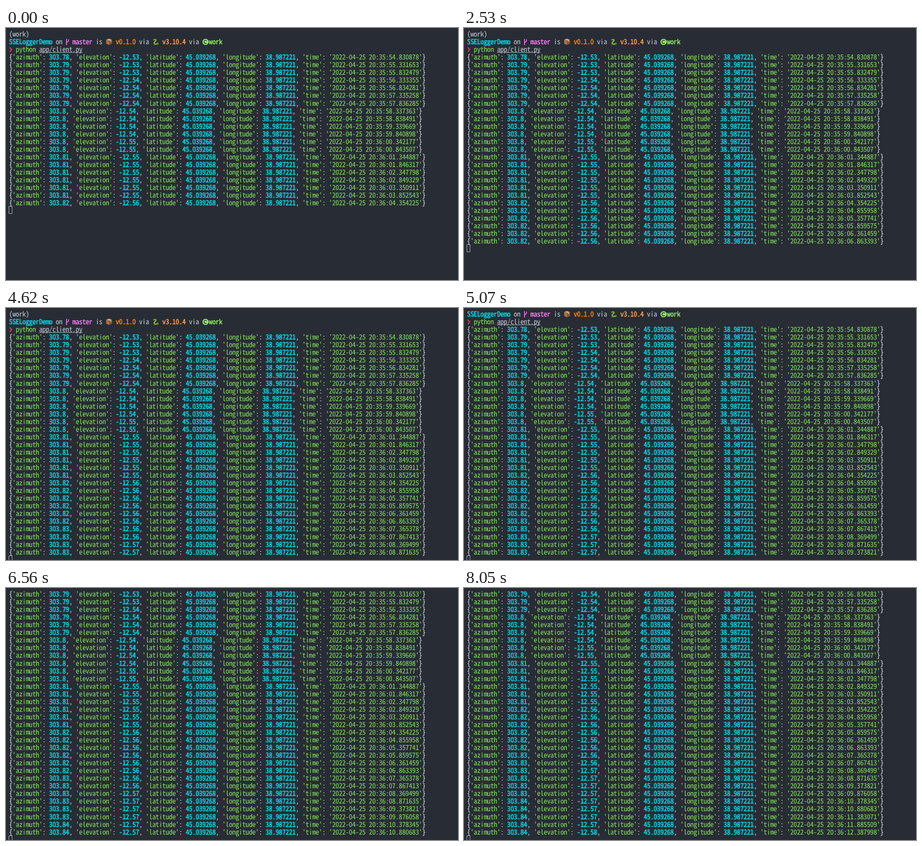
An HTML page with a canvas that plays this animation: 1000x560 px, repeating every 8200 ms.

```html
<!DOCTYPE html>
<html lang="en">
<head>
<meta charset="utf-8">
<title>Terminal log</title>
<style>
html, body { margin: 0; width: 100%; height: 100%; overflow: hidden; background: #282c34; }
canvas { display: block; width: 100vw; height: 100vh; }
</style>
</head>
<body>
<canvas id="term" width="1000" height="560"></canvas>
<script>
const ctx = document.getElementById('term').getContext('2d');
const LOOP = 8200, LEFT = 7, CELL = 7.37, PITCH = 17.05, MIDDLE = 13.4, LAST_ROW = 32;
const FAMILY = '"Noto Sans Mono CJK JP", "Noto Sans Mono CJK SC", "Noto Sans Mono", "DejaVu Sans Mono", monospace';
const C = {
  bg: '#282c34', fg: '#b9bfca', green: '#7fd65f', cyan: '#00dfee', lime: '#8bee5b',
  pink: '#f07af0', orange: '#ff8700', amber: '#ffa348', red: '#f0455a'
};

const START_COUNT = 20;
const TICK = 149.07, TICK_LEAD = 8; // screen refresh period, ms
const TICKS_PER_RECORD = 3.36;

// Records arrive every half second, with a delay that slowly builds up.
function timeStamp(i) {
  const delay = (0.75 * i + 0.0252 * i * i) / 1000;
  const sec = 54.830878 + i / 2 + delay;
  const minute = 35 + Math.floor(sec / 60);
  return `20:${minute}:${(sec % 60).toFixed(6).padStart(9, '0')}`;
}

function record(i) {
  const azimuth = +(303.78 + Math.ceil(i / 6) / 100).toFixed(2);
  const elevation = (-12.53 - Math.floor((i + 5) / 8) / 100).toFixed(2);
  return `{'azimuth': ${azimuth}, 'elevation': ${elevation}, 'latitude': 45.039268, ` +
    `'longitude': 38.987221, 'time': '2022-04-25 ${timeStamp(i)}'}`;
}

function recordCount(t) {
  const tick = Math.floor((t + TICK_LEAD) / TICK);
  return START_COUNT + Math.max(0, Math.floor((tick - 0.16) / TICKS_PER_RECORD));
}

// Font size from the cell width, a little tight like a narrow terminal face.
ctx.textRendering = 'geometricPrecision';
ctx.font = `1000px ${FAMILY}`;
const digit = ctx.measureText('0');
const size = 1.05 * CELL / digit.width * 1000;
const digitHeight = digit.actualBoundingBoxAscent * size / 1000;

const colX = col => LEFT + col * CELL;
const baseline = row => Math.round(MIDDLE + digitHeight / 2 + row * PITCH);

// A thin outline over the regular weight gives the semi-bold look.
function put(text, col, row, color, bold) {
  ctx.font = `${size}px ${FAMILY}`;
  ctx.textAlign = 'center';
  ctx.lineJoin = 'round';
  ctx.fillStyle = ctx.strokeStyle = color;
  ctx.lineWidth = bold ? 0.5 : 0.12;
  const y = baseline(row);
  [...text].forEach((ch, i) => {
    if (ch === ' ') return;
    const x = colX(col + i + 0.5);
    ctx.fillText(ch, x, y);
    ctx.strokeText(ch, x, y);
  });
}

function stroke(color, width, trace) {
  ctx.strokeStyle = color;
  ctx.lineWidth = width;
  ctx.beginPath();
  trace();
  ctx.stroke();
}

function poly(color, ...pts) {
  ctx.fillStyle = color;
  ctx.beginPath();
  pts.forEach(([x, y]) => ctx.lineTo(x, y));
  ctx.fill();
}

function at(col, row, draw) {
  ctx.save();
  ctx.translate(colX(col), 5 + row * PITCH);
  draw();
  ctx.restore();
}

function branchIcon() {
  stroke(C.pink, 1.7, () => {
    ctx.moveTo(1.6, 2);
    ctx.lineTo(1.6, 16);
    ctx.moveTo(6, 3);
    ctx.lineTo(6, 6);
    ctx.bezierCurveTo(6, 10, 1.6, 8, 1.6, 12);
  });
}

function boxIcon() {
  poly('#c58a5a', [7.4, 1.5], [14, 4], [7.4, 6.8], [0.8, 4]);
  poly('#a9704a', [0.8, 4], [7.4, 6.8], [7.4, 15.8], [0.8, 12.8]);
  poly('#895437', [14, 4], [7.4, 6.8], [7.4, 15.8], [14, 12.8]);
  poly('#e3c29a', [3.3, 3], [5, 2.4], [11.6, 5], [11.6, 8], [9.9, 8.7], [9.9, 5.7]);
}

function snakeIcon() {
  ctx.lineCap = 'round';
  stroke('#8bb83e', 2.6, () => {
    ctx.moveTo(3, 4.2);
    ctx.bezierCurveTo(9, 2, 9, 6, 6, 8);
    ctx.bezierCurveTo(2, 11, 4, 14, 8, 13.5);
    ctx.lineTo(12.5, 13);
  });
  stroke('#688e2d', 1.8, () => {
    ctx.moveTo(3.5, 14.5);
    ctx.lineTo(10, 14.5);
    ctx.quadraticCurveTo(14, 13, 12, 10.5);
  });
  ctx.fillStyle = C.bg;
  ctx.fillRect(3.4, 3.4, 1, 1);
}

function envIcon() {
  ctx.fillStyle = C.lime;
  ctx.beginPath();
  ctx.arc(7, 8.8, 6.9, 0, 2 * Math.PI);
  ctx.fill();
  stroke(C.bg, 1.7, () => ctx.arc(7.2, 8.8, 3.5, 0.75, 2 * Math.PI - 0.75));
}

function drawStatus(row) {
  put('SSELoggerDemo', 0, row, C.cyan, true);
  put('on', 14, row, C.fg);
  at(17, row, branchIcon);
  put('master', 19, row, C.pink, true);
  put('is', 26, row, C.fg);
  at(29, row, boxIcon);
  put('v0.1.0', 32, row, C.orange, true);
  put('via', 39, row, C.fg);
  at(43, row, snakeIcon);
  put('v3.10.4', 46, row, C.amber, true);
  put('via', 54, row, C.fg);
  at(58, row, envIcon);
  put('work', 60, row, C.lime, true);
}

function drawCommand(row) {
  at(0, row, () => stroke(C.red, 2, () => {
    ctx.moveTo(1.5, 4);
    ctx.lineTo(5.5, 8.9);
    ctx.lineTo(1.5, 13.8);
  }));
  put('python', 2, row, C.green);
  put('app/client.py', 9, row, C.fg);
  ctx.fillRect(colX(9), Math.round(19.5 + row * PITCH), 13 * CELL, 1);
}

function drawRecord(text, row) {
  for (const { 0: token, index } of text.matchAll(/'[^']*'|-?\d[\d.]*|[{}:,]/g)) {
    if (token[0] === "'") put(token, index, row, C.green);
    else if (/\d/.test(token)) put(token, index, row, C.cyan, true);
    else put(token, index, row, C.fg, /[{}]/.test(token));
  }
}

const header = [row => put('(work)', 0, row, C.fg), drawStatus, drawCommand];

function draw(count) {
  ctx.fillStyle = C.bg;
  ctx.fillRect(0, 0, 1000, 560);
  const lines = header.length + count;
  const scroll = Math.max(0, lines - LAST_ROW);
  for (let i = scroll; i < lines; i++) {
    const row = i - scroll;
    if (i < header.length) header[i](row);
    else drawRecord(record(i - header.length), row);
  }
  const top = Math.round(5 + (lines - scroll) * PITCH);
  stroke(C.fg, 1, () => ctx.rect(LEFT - 0.5, top - 0.5, 7, 16));
}

let shown = -1;
const origin = performance.now();

function tick() {
  const count = recordCount((performance.now() - origin) % LOOP);
  if (count !== shown) draw(shown = count);
  requestAnimationFrame(tick);
}
tick();
</script>
</body>
</html>
```
